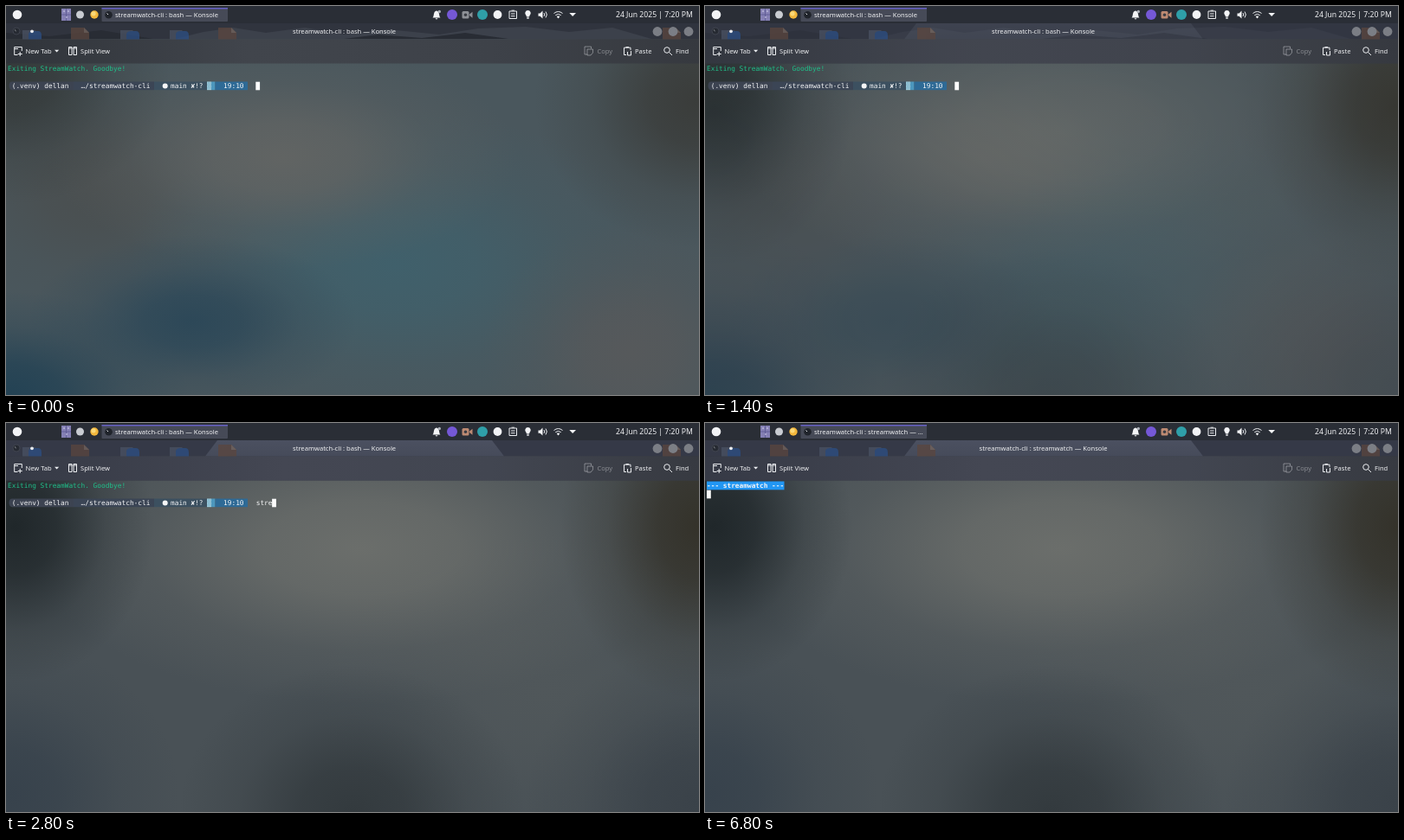
These frames come from a looping animation (800x450 px, 8000 ms). An HTML page:

```html
<!DOCTYPE html>
<html lang="en">
<head>
<meta charset="utf-8">
<title>Terminal session</title>
<style>
  html, body { margin: 0; width: 100%; height: 100%; overflow: hidden; background: #2a2e36; }
  #stage { position: relative; width: 800px; height: 450px; overflow: hidden; }
  #stage > * { position: absolute; left: 0; top: 0; width: 800px; height: 450px; }
  text { white-space: pre; }
  .ui { font: 7.57px "Noto Sans", sans-serif; fill: #f0f1f3; }
  .clock { font-size: 8.65px; }
  .mono { font: 7.807px "DejaVu Sans Mono", monospace; fill: #f4f5f6; }
  .bold { font-weight: bold; }
  .mid { text-anchor: middle; }
  .line { fill: none; stroke: #eceef1; stroke-width: 1; }
</style>
</head>
<body>
<div id="stage">
  <div id="wallA"></div>
  <div id="wallB"></div>
  <svg viewBox="0 0 800 450">
    <defs>
      <linearGradient id="glow" x1="0" y1="0" x2="0" y2="1">
        <stop offset="0" stop-color="#4b5060"/><stop offset="1" stop-color="#464b5a"/>
      </linearGradient>
      <linearGradient id="barA">
        <stop offset="0" stop-color="#30343a"/><stop offset=".35" stop-color="#41454c"/>
        <stop offset=".7" stop-color="#3e4249"/><stop offset="1" stop-color="#36393f"/>
      </linearGradient>
      <linearGradient id="barB">
        <stop offset="0" stop-color="#363a46"/><stop offset=".4" stop-color="#444753"/>
        <stop offset=".7" stop-color="#424651"/><stop offset="1" stop-color="#373a41"/>
      </linearGradient>
      <clipPath id="strip"><rect y="20" width="800" height="18.5"/></clipPath>
    </defs>

    <!-- window bars over each wallpaper -->
    <g id="barsA">
      <rect y="20" width="800" height="18.5" fill="#30343e"/>
      <path d="M195 38L228 30 262 25 300 31 345 25 390 33 440 27 500 33 545 26 600 24 650 30 700 25 745 38Z" fill="#3c414b"/>
      <path d="M0 38V31L50 35 110 28 170 38ZM390 38L430 33 480 37 530 31 580 38Z" fill="#282c34"/>
      <rect y="38.5" width="800" height="28" fill="url(#barA)"/>
    </g>
    <g id="barsB">
      <rect y="20" width="800" height="18.5" fill="#353947"/>
      <path d="M244 20H561L575 38.5H230Z" fill="url(#glow)"/>
      <rect y="38.5" width="800" height="28" fill="url(#barB)"/>
    </g>
    <g id="files" clip-path="url(#strip)"></g>

    <!-- title bar -->
    <circle cx="12" cy="29" r="4" fill="#262a32" stroke="#484d58" stroke-width=".7"/>
    <path class="line" d="M10 27.5l1.6 1.5" stroke-opacity=".6" stroke-width=".7"/>
    <circle cx="30" cy="29.3" r="1.9" fill="#e8eaee"/>
    <text id="title" class="ui mid" x="390.6" y="31.6"></text>
    <g fill="#7b7e85">
      <circle cx="752" cy="29.5" r="5.4"/><circle cx="770" cy="29.5" r="5.4"/><circle cx="788" cy="29.5" r="5.4"/>
    </g>

    <!-- toolbar -->
    <g class="line">
      <path d="M13.5 56.5H9.7V47.5H18.3V52M10 49.5H14M16.2 53v5M13.7 55.5h5"/>
      <path d="M72.5 47.5H76V56.5H72.5ZM78 47.5H81.5V56.5H78ZM72 49H76.5M77.5 49H82"/>
      <path d="M671 56H668V47H675.500V49.500M671 50H677.500V54L675 57H671Z" opacity=".4"/>
      <path d="M716 56.5H713.500V48.200H721V51M715.500 47.500H719M721.500 52V57H717.500V53"/>
      <circle cx="763" cy="51" r="3.300"/><path d="M765.500 53.500L769 57"/>
    </g>
    <path d="M56 50.800H61.200L58.600 53.600Z" fill="#eceef1"/>
    <g class="ui">
      <text x="22.500" y="54.800">New Tab</text>
      <text x="86" y="54.800">Split View</text>
      <text x="682.500" y="54.800" opacity=".42">Copy</text>
      <text x="726" y="54.800">Paste</text>
      <text x="773" y="54.800">Find</text>
    </g>

    <!-- top panel -->
    <rect width="800" height="20" fill="#2a2e36"/>
    <circle cx="13" cy="10" r="5.300" fill="#f2f3f5"/>
    <rect x="64" y="3" width="11" height="14" fill="#8580b4"/>
    <path d="M64 10H75M69.500 3V17" stroke="#5a5792" stroke-width=".8"/>
    <path d="M66 6h2M71 6h2M69 13h2" stroke="#d4d2ee" stroke-width="1"/>
    <circle cx="85.500" cy="10" r="4.500" fill="#c9ccd1"/>
    <circle cx="102" cy="10" r="4.700" fill="#f3b73c"/>
    <circle cx="101" cy="8.800" r="2.600" fill="#fbd978"/>
    <rect x="110.500" y="2" width="145.500" height="16" rx="1" fill="#464a57"/>
    <rect x="110.500" y="2" width="145.500" height="1.500" fill="#6560c4"/>
    <circle cx="118.500" cy="10.300" r="4.300" fill="#20242b"/>
    <path class="line" d="M116.500 8.500l1.500 1.500" stroke-width=".7"/>
    <text id="task" class="ui" x="126" y="12.900"></text>

    <!-- tray -->
    <path d="M492.500 13.500C494.500 12 493 6 497 5.500 501 6 499.500 12 501.500 13.500ZM495.500 14.300H498.500L497 15.800Z" fill="#f2f3f5"/>
    <circle cx="500.300" cy="6.500" r="1.700" fill="#aeb2ba"/>
    <circle cx="515" cy="10" r="6" fill="#7558d6"/>
    <g id="camera">
      <rect x="526.500" y="6" width="8" height="8.500" rx="1.500"/>
      <path d="M535 9.500L538.500 6.800V13.700L535 11Z"/>
      <circle cx="530.500" cy="10.200" r="1.800" fill="#3a3d44"/>
    </g>
    <circle cx="550" cy="10" r="6" fill="#2f9fa8"/>
    <circle cx="567.500" cy="10" r="4.900" fill="#f2f3f5"/>
    <path class="line" d="M581 6H589.500V14.500H581ZM583.500 5.200H587M583 9H587.500M583 11.700H587.500"/>
    <path d="M602.500 5a3.300 3.300 0 0 1 2 5.900L604 12.500H601L600.500 10.900A3.300 3.300 0 0 1 602.500 5ZM601.300 13.200H603.700V14.700H601.300Z" fill="#f2f3f5"/>
    <path d="M614.500 8.500H616.500L619.500 5.500V14.500L616.500 11.700H614.500Z" fill="#f2f3f5"/>
    <path class="line" d="M621 8q1.500 2 0 4M623 6.500q2.700 3.500 0 7"/>
    <path class="line" d="M632.500 8.500q5-4 10 0M634.300 10.700q3.200-2.600 6.400 0"/>
    <path d="M635.700 12.300q1.800-1.400 3.600 0L637.500 14.500Z" fill="#f2f3f5"/>
    <path d="M650.300 8H658L654.150 12Z" fill="#f2f3f5"/>
    <text class="ui clock" x="704" y="13.200">24 Jun 2025 | 7:20 PM</text>

    <!-- terminal -->
    <g id="shell">
      <text class="mono" x="2" y="75" style="fill:#1fc08a">Exiting StreamWatch. Goodbye!</text>
      <path d="M7 87.500H78V97.200H7Q3.500 97 3.500 92.300T7 87.500Z" fill="#3c4351"/>
      <rect x="78" y="87.500" width="93" height="9.700" fill="#3b4555"/>
      <rect x="171" y="87.500" width="61" height="9.700" fill="#3c5060"/>
      <rect x="232" y="87.500" width="5" height="9.700" fill="#9ccbdc"/>
      <path d="M233 89H237M232.500 91H237M233 93H237M232.500 95H237" stroke="#3f7c9e" stroke-width=".7" stroke-dasharray="1 1"/>
      <rect x="237" y="87.500" width="4.500" height="9.700" fill="#4c97bd"/>
      <rect x="241.500" y="87.500" width="37.500" height="9.700" fill="#2e6a96"/>
      <circle cx="183.700" cy="92.600" r="3" fill="#f4f5f6"/>
      <g id="prompt" class="mono"></g>
    </g>
    <g id="app">
      <rect x="2" y="67.500" width="89.500" height="9.800" fill="#2196f3"/>
      <text class="mono bold" x="2" y="75">--- streamwatch ---</text>
    </g>
    <rect id="cursor" width="4.800" height="9.600" fill="#fcfcfc"/>
  </svg>
</div>
<script>
const LOOP = 8000, CELL = 4.7, CMD_COL = 61, CMD = 'streamwatch';
const ENTER = 6000, CLEAR = 6800, REC = 200;
const $ = id => document.getElementById(id);
const colX = col => 2 + col * CELL;

// [start ms, value]
const typed = [[0, 0], [2400, 3], [2800, 4], [3400, 5], [3600, 6], [4200, 7],
  [4400, 8], [4800, 9], [5400, 10], [5600, 11]];
const fade = [[0, 0], [1000, .12], [1200, .3], [1400, .52], [1600, .74], [1800, .9], [2000, 1]];
const valueAt = (table, t) => table.filter(([start]) => start <= t).pop()[1];

const blob = ([x, y, rx, ry, c]) =>
  `radial-gradient(${rx}px ${ry}px at ${x}px ${y}px, ${c}ff, ${c}cc 30%, ${c}44 66%, ${c}00)`;
const paint = (id, base, blobs) => {
  $(id).style.background = [...blobs.map(blob), base].join(',');
};

paint('wallA', '#4a575d', [
  [0, 80, 190, 150, '#343939'],
  [800, 110, 190, 170, '#3a3c3a'],
  [215, 365, 190, 100, '#2d4858'],
  [0, 450, 210, 120, '#234254'],
  [720, 400, 170, 150, '#56595b'],
  [320, 175, 270, 130, '#616463'],
  [450, 300, 310, 180, '#40606b'],
  [100, 210, 200, 150, '#4a4f50']
]);
paint('wallB', '#495156', [
  [10, 120, 160, 180, '#20272a'],
  [800, 120, 160, 200, '#34322a'],
  [400, 450, 200, 170, '#333a3e'],
  [410, 145, 380, 180, '#6b6e6b'],
  [0, 430, 200, 180, '#37424c'],
  [800, 440, 200, 180, '#3a4249'],
  [620, 310, 260, 180, '#50575a']
]);

const BLUE = '#2c4f84', BROWN = '#5b463e';
$('files').innerHTML = [[30, BLUE], [85, BROWN], [143, BLUE], [200, BLUE], [255, BROWN], [768, BROWN]]
  .map(([x, c]) => `<g transform="translate(${x} 25)" opacity=".75">` + (c === BLUE
    ? '<path d="M-11 3H3L7 7V14H-11Z" fill="#4a5263"/><path d="M-4 14V8Q-4 4 2 4H7Q11 4 11 9V14Z" fill="' + c + '"/>'
    : `<path d="M-10 0H5L11 6V14H-10Z" fill="${c}"/><path d="M5 0V6H11Z" fill="#75645c"/>`) + '</g>').join('');

$('prompt').innerHTML = [[1, '(.venv) dellan'], [18, '…/streamwatch-cli'], [40, 'main ✘!?'], [53, '19:10'], [CMD_COL, '']]
  .map(([col, s]) => `<text x="${colX(col)}" y="95">${s}</text>`).join('');
const command = $('prompt').lastElementChild;

const show = (id, on) => { $(id).style.display = on ? '' : 'none'; };
const setText = (node, s) => { if (node.textContent !== s) node.textContent = s; };

function draw(t) {
  const mix = valueAt(fade, t), count = valueAt(typed, t);
  const running = t >= ENTER, cleared = t >= CLEAR;
  $('wallB').style.opacity = $('barsB').style.opacity = mix;
  $('camera').setAttribute('fill', t < REC ? '#8d9096' : '#bd8a72');
  setText($('title'), `streamwatch-cli : ${running ? CMD : 'bash'} — Konsole`);
  setText($('task'), running ? `streamwatch-cli : ${CMD} — …` : 'streamwatch-cli : bash — Konsole');
  setText(command, CMD.slice(0, count));
  show('shell', !cleared);
  show('app', cleared);
  $('cursor').setAttribute('x', running ? 2 : colX(CMD_COL + count) - .4);
  $('cursor').setAttribute('y', cleared ? 77.7 : running ? 97.8 : 87.7);
}

const start = performance.now();
function tick() {
  draw((performance.now() - start) % LOOP);
  requestAnimationFrame(tick);
}
tick();
</script>
</body>
</html>
```
